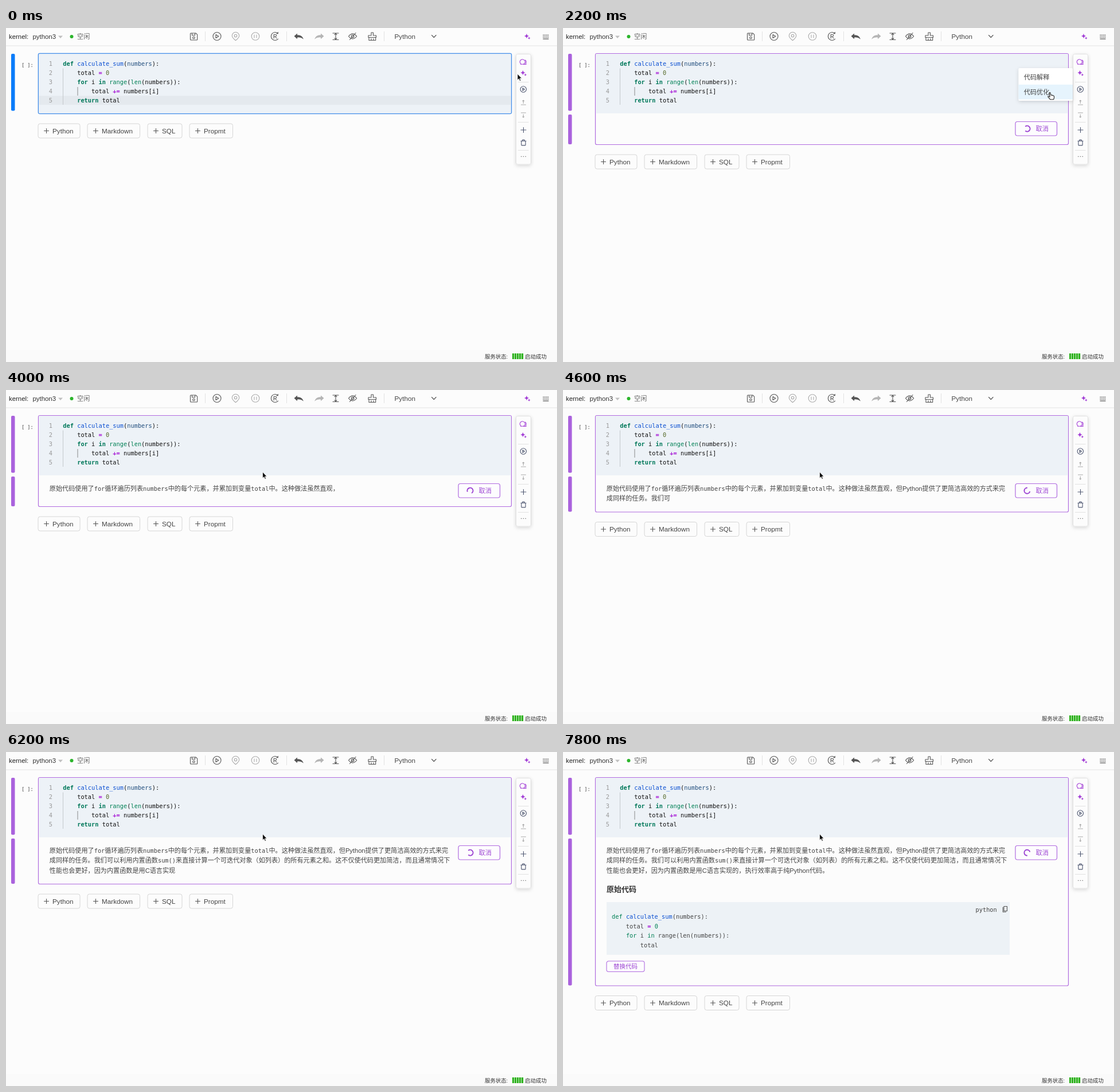
These frames come from a looping animation (961 by 583 pixels, 8 s). An HTML page:

```html
<!DOCTYPE html>
<html lang="zh-CN">
<head>
<meta charset="utf-8">
<title>Notebook assistant</title>
<style>
html, body { margin: 0; width: 100%; height: 100%; overflow: hidden; background: #fcfcfc; }
svg { display: block; width: 961px; height: 583px; }
text { font-family: "Liberation Sans", "Noto Sans CJK SC", "Noto Sans CJK", sans-serif; font-size: 11.13px; fill: #444; white-space: pre; }
.mono { font-family: "DejaVu Sans Mono", "Noto Sans CJK SC", monospace; font-size: 10.34px; }
.code { fill: #111; }
.kw { fill: #00785a; font-weight: bold; }
.tag { fill: #008055; }
.fn { fill: #0a4fd2; }
.par { fill: #24507f; }
.op { fill: #a71bd6; font-weight: bold; }
.num { fill: #566b2a; }
.zero { fill: #008055; }
.icon { fill: none; stroke: #555; stroke-width: 1.1; stroke-linecap: round; stroke-linejoin: round; }
.dim { stroke: #aaa; }
.violet { stroke: #a33fd6; }
.rule { stroke: #e2e2e2; fill: none; }
.box { fill: #fcfcfc; stroke: #d6d6d6; }
.outline { fill: #fdfcfe; stroke: #b06be0; }
.accent { fill: #9d45d3; }
</style>
</head>
<body>
<svg viewBox="0 0 961 583">
  <defs>
    <g id="sparkle" fill="#a33fd6">
      <path d="M-1-5Q-.5-1 3.4-.5Q-.5 0-1 4Q-1.5 0-5.4-.5Q-1.5-1-1-5Z"/>
      <path d="M3.3.8Q3.6 2.9 5.6 3.2Q3.6 3.5 3.3 5.6Q3 3.5 1 3.2Q3 2.9 3.3.8Z"/>
    </g>
    <filter id="shadow" x="-20%" y="-20%" width="140%" height="150%">
      <feDropShadow dx="0" dy="2" stdDeviation="3" flood-opacity=".15"/>
    </filter>
  </defs>
  <rect width="961" height="583" fill="#fcfcfc"/>
  <rect y="562" width="961" height="21" fill="#fafafa"/>
  <path class="rule" d="M0 31H961"/>

  <!-- header -->
  <g style="font-size:11.4px">
    <text x="5" y="18.5" style="font-size:11.4px;fill:#222">kernel</text>
    <text x="36" y="18.5" style="fill:#222">:</text>
    <text x="46.5" y="18.5" style="font-size:11.4px;fill:#333">python3</text>
    <path d="M91 13.5h8l-4 4.5z" fill="#bfbfbf"/>
    <circle cx="114.5" cy="15" r="3" fill="#2bb52b"/>
    <text x="124" y="18.8" style="fill:#666">空闲</text>
  </g>
  <path class="rule" d="M347.5 6V23M489.5 6V23M659.5 6V23"/>
  <g class="icon">
    <path d="M322.5 9h8.5l2.7 2.7v8.3q0 1-1 1h-10.2q-1 0-1-1v-10q0-1 1-1zM324.5 9.3v3.4h5v-3.4"/>
    <circle cx="327.5" cy="17" r="1.8"/>
    <circle cx="368" cy="14.5" r="7"/><path d="M366 11.5v6l4.8-3z"/>
    <g class="dim">
      <path d="M400.5 21.8Q394.3 16.8 394.3 13.5A6.2 6.2 0 0 1 406.7 13.5Q406.7 16.8 400.5 21.8Z"/>
      <circle cx="400.5" cy="13.5" r="2.3"/>
      <circle cx="435" cy="14.5" r="6.8"/><path d="M433 12v5M437 12v5"/>
    </g>
    <path d="M474.5 19.2A7 7 0 1 1 474 9.3M474.3 7.4v2.4h-2.4M467.2 18v-6.8h2.5a1.9 1.9 0 0 1 0 3.8h-2.5M469.6 15l2.2 3"/>
    <path d="M575 9.5v10.5M570 9h10M570 20.5h10M573 11.7l2-2 2 2M573 17.8l2 2 2-2"/>
    <path d="M597.5 14.5Q604.5 5.8 611.7 14.5Q604.5 23.2 597.5 14.5ZM599.5 20.5L610 8.5"/>
    <circle cx="604.6" cy="14.5" r="2.3"/>
    <path d="M637 8h3.5v5h5v3.5h-13.5v-3.5h5zM633 16.5v5h11.7v-5M637 21v-2.5M641 21v-2.5"/>
    <path d="M742.5 12.5l3.8 4 3.8-4"/>
  </g>
  <path d="M502.5 14.3L508 9.5V12.4Q516 11.8 519 19.5Q514 15.5 508 16.4V19.2Z" fill="#555"/>
  <path d="M554.5 14.3L549 9.5V12.4Q541 11.8 538 19.5Q543 15.5 549 16.4V19.2Z" fill="#b5b5b5"/>
  <text x="677.5" y="18.5" style="font-size:11.7px">Python</text>
  <use href="#sparkle" x="909" y="14.5"/>
  <path d="M936.5 12.5h10M936.5 15.8h10" stroke="#555" stroke-width="1.5" stroke-dasharray="1.7 1"/>
  <path d="M936.5 19h10" stroke="#555" stroke-width="1.3"/>

  <!-- cell -->
  <rect id="bar" x="9" y="45" width="6.5" height="99.5" rx="2"/>
  <rect id="bar2" x="9" y="151" width="6.5" rx="2" fill="#aa62dd"/>
  <text class="mono" x="27" y="67.5" style="font-size:8.6px">[ ]:</text>
  <rect id="frame" x="56.5" y="44.5" width="825" rx="2.5" fill="#fcfcfc"/>
  <rect x="57.3" y="45.3" width="823.4" height="103.5" fill="#edf2f7"/>
  <rect id="activeLine" x="57.3" y="118.5" width="823.4" height="15.5" fill="#e4e9ee"/>
  <path d="M99.5 70.5V134" stroke="#c4c8cc"/>
  <path d="M125 103V118" stroke="#888"/>
  <g id="source"></g>

  <!-- answer -->
  <g id="answer">
    <rect class="outline" x="789" y="163.5" width="72.5" height="24.5" rx="3.5" stroke-width="1.2"/>
    <path id="spinner" fill="none" stroke="#9d45d3" stroke-width="2"/>
    <text class="accent" x="824.5" y="179.8">取消</text>
    <g id="prose"></g>
    <text id="heading" x="76" y="244" style="font-size:13px;font-weight:bold;fill:#333"></text>
    <g id="snippet">
      <rect id="snippetBox" x="76" y="262" width="703" fill="#edf2f6"/>
      <text class="mono" x="719.5" y="279">python</text>
      <path class="icon" d="M769 269.5h5.5v8h-5.5zM767.3 271v8.3h5.2" stroke-width="1"/>
      <g id="snippetCode"></g>
      <g id="replace">
        <rect class="outline" x="76" y="0" width="66" height="18.5" rx="3.5" stroke-width="1.1"/>
        <text class="accent" x="88" y="13.2" style="font-size:10.5px">替换代码</text>
      </g>
    </g>
  </g>
  <g id="adders"></g>

  <!-- side tools -->
  <rect x="889.5" y="45.5" width="26" height="192.5" rx="3" fill="#fcfcfc" stroke="#e0e0e0" filter="url(#shadow)" style="flood-opacity:.05"/>
  <rect id="hover" x="890" y="70" width="25" height="23.5" fill="#f0f0f0"/>
  <path class="rule" d="M893 94.5h18.5M893 164.5h18.5M893 213.5h18.5"/>
  <g class="icon">
    <path class="violet" d="M898 62.5a4.6 4.3 0 1 1 4 .8h-4.5zM905.5 56a3.7 3.7 0 0 1 1 5.5l.6 2h-4"/>
    <g stroke="#4d5670">
      <circle cx="902.3" cy="107" r="5.2"/><path d="M901 104.8v4.4l3.4-2.2z"/>
      <path d="M898 178h9M902.5 173.5v9M898 197.3h9M900.7 197v-1.6h3.6v1.6M898.9 197.5v6.4q0 1 1 1h5.2q1 0 1-1v-6.4"/>
    </g>
    <path class="dim" d="M898.5 134h8M902.3 131.5v-5M901 127.5l1.3-1.3 1.3 1.3M898.5 148h8M902.3 151v5M901 154.8l1.3 1.3 1.3-1.3"/>
  </g>
  <path d="M898 224.3h9.5" stroke="#777" stroke-width="1.2" stroke-dasharray="1.4 2.4"/>
  <use href="#sparkle" x="902.5" y="78.5"/>

  <g id="menu">
    <rect x="794.5" y="70" width="94.5" height="57" rx="2" fill="#fff" filter="url(#shadow)"/>
    <rect id="menuHover" x="794.5" y="98.8" width="94.5" height="25.7" fill="#e6f4fd"/>
    <text x="803.8" y="90">代码解释</text>
    <text x="803.8" y="115.6">代码优化</text>
  </g>

  <!-- status -->
  <text x="835" y="576.5" style="font-size:9.4px;fill:#333">服务状态:</text>
  <path d="M883 573h19.4" stroke="#2fb31f" stroke-width="10" stroke-dasharray="3.2 .8"/>
  <text x="905" y="576.5" style="font-size:9.5px;fill:#333">启动成功</text>

  <path id="arrow" d="M0 0V11L2.5 8.7L4.2 12.5L6 11.7L4.3 8H7.6Z" fill="#111" stroke="#fff" stroke-width=".8"/>
  <path id="hand" d="M-1 .2Q0-1 1 .2L2 4.3Q3.2 3.5 4 4.6Q5.2 4 5.8 5Q7.3 4.8 7.5 6.3Q8 9 6.7 11.8H.8Q-1.5 8.8-3.2 7.2Q-3.4 5.6-1.7 6.1L.2 7.3Z" fill="#fff" stroke="#222" stroke-width="1.1" stroke-linejoin="round"/>
</svg>
<script>
const LOOP = 8000, STEP = 200;
const $ = id => document.getElementById(id);
const set = (id, attrs) => Object.entries(attrs).forEach(([k, v]) => $(id).setAttribute(k, v));
const show = (id, on) => { $(id).style.display = on ? "" : "none"; };
const escape = s => s.replace(/&/g, "&amp;").replace(/</g, "&lt;");

// Each line is a list of [text, class] runs.
const source = [
  [["def ", "kw"], ["calculate_sum", "fn"], ["("], ["numbers", "par"], ["):"]],
  [["    total "], ["=", "op"], [" "], ["0", "num"]],
  [["    "], ["for", "kw"], [" i "], ["in", "kw"], [" "], ["range", "tag"], ["("], ["len", "tag"], ["(numbers)):"]],
  [["        total "], ["+=", "op"], [" numbers[i]"]],
  [["    "], ["return", "kw"], [" total"]]
];
const prose = [
  [["原始代码使用了"], ["for", "mono"], ["循环遍历列表"], ["numbers", "mono"], ["中的每个元素,并累加到变量"], ["total", "mono"], ["中。这种做法虽然直观,但Python提供了更简洁高效的方式来完"]],
  [["成同样的任务。我们可以利用内置函数"], ["sum()", "mono"], ["来直接计算一个可迭代对象(如列表)的所有元素之和。这不仅使代码更加简洁,而且通常情况下"]],
  [["性能也会更好,因为内置函数是用C语言实现的,执行效率高于纯Python代码。"]]
].map(line => line.map(([s, c]) => [c ? s : s.replace(/,/g, "\uff0c").replace(/\(/g, "\uff08").replace(/\)/g, "\uff09"), c]));
const heading = "原始代码";
const snippet = [
  [["def ", "tag"], ["calculate_sum", "fn"], ["(numbers):"]],
  [["    total "], ["=", "op"], [" "], ["0", "zero"]],
  [["    "], ["for", "tag"], [" i "], ["in", "tag"], [" range(len(numbers)):"]],
  [["        total"]]
];
const size = lines => lines.flat().reduce((n, [s]) => n + s.length, 0);
const proseSize = size(prose), snippetSize = size(snippet);

// Writes the first `count` characters and returns the number of lines begun.
function write(id, lines, x, y, gap, cls, count = Infinity) {
  let begun = 0, html = "";
  lines.forEach((line, i) => {
    if (count <= 0) return;
    begun++;
    html += `<text class="${cls}" x="${x}" y="${y + i * gap}">`;
    for (const [s, c = ""] of line) {
      html += `<tspan class="${c}">${escape(s.slice(0, Math.max(0, count)))}</tspan>`;
      count -= s.length;
    }
    html += "</text>";
  });
  $(id).innerHTML = html;
  return begun;
}

// Linear interpolation over rows of [time, ...values].
function track(rows, t) {
  const i = rows.findIndex(r => r[0] > t);
  if (i < 0) return rows[rows.length - 1].slice(1);
  if (i === 0) return rows[0].slice(1);
  const a = rows[i - 1], b = rows[i], p = (t - a[0]) / (b[0] - a[0]);
  return a.slice(1).map((v, k) => v + (b[k + 1] - v) * p);
}

const pointer = [[0, 892, 80], [200, 894, 81], [600, 901, 80], [1400, 901, 80], [1600, 885, 97],
  [1800, 856, 111], [2000, 849, 113], [2400, 849, 113], [2600, 690, 128], [2800, 500, 141], [3000, 447.5, 143]];
const typed = [[3000, 0], [4000, 52], [5400, 122], [6200, 157], [6600, proseSize],
  [6800, proseSize + heading.length], [7800, proseSize + heading.length + snippetSize]];

write("source", source, 99.3, 66.3, 16, "mono code");
$("source").innerHTML += source.map((_, i) =>
  `<text class="mono" x="74.8" y="${66.3 + i * 16}" style="fill:#999">${i + 1}</text>`).join("");
$("adders").innerHTML = [["Python", 56, 73], ["Markdown", 142, 91.5], ["SQL", 247, 60], ["Propmt", 320, 75.5]]
  .map(([label, x, w]) => `<rect class="box" x="${x}" y="18" width="${w}" height="25" rx="3.5"/>
    <path class="icon" d="M${x + 10.5} 30.5h8M${x + 14.5} 26.5v8" stroke-width="1"/>
    <text x="${x + 25}" y="34.5" style="font-size:11.7px">${label}</text>`).join("");

function draw(t) {
  const busy = t >= 2200;
  const count = Math.round(track(typed, t)[0]);
  const headCount = count - proseSize, codeCount = headCount - heading.length;
  let bottom = 149.5;

  show("answer", busy);
  show("bar2", busy);
  show("activeLine", !busy);
  if (busy) {
    const lines = write("prose", prose, 75.8, 175.8, 17.5, "", count);
    bottom = [203.5, 203.5, 213, 230.5][lines];
    $("heading").textContent = heading.slice(0, Math.max(0, headCount));
    if (headCount > 0) bottom = 263;
    show("snippet", codeCount > 0);
    if (codeCount > 0) {
      const rows = write("snippetCode", snippet, 85, 291.4, 16.4, "mono", codeCount);
      const end = 354 - (4 - rows) * 16.4;
      set("snippetBox", { height: end - 262 });
      set("replace", { transform: `translate(0 ${end + 11})` });
      bottom = end + 54;
    }
    const gap = 180 + (t - 2200) * .36;
    set("spinner", { d: "M3.2 3.8A5 5 0 1 1 3.2-3.8", transform: `translate(809.5 175.8) rotate(${gap})` });
    set("bar2", { height: bottom - 151.5 });
  }
  set("bar", { fill: busy ? "#aa62dd" : "#0b7cfa" });
  set("frame", { height: bottom - 44.5, stroke: busy ? "#b06be0" : "#468fe9", "stroke-width": busy ? 1.2 : 1.6 });
  set("adders", { transform: `translate(0 ${bottom - .5})` });

  const [x, y] = track(pointer, t), hand = t >= 400 && t < 2600;
  show("arrow", !hand);
  show("hand", hand);
  set(hand ? "hand" : "arrow", { transform: `translate(${x} ${y})` });
  show("hover", t >= 400 && t < 1600);
  show("menu", t >= 1400 && t < 2600);
  show("menuHover", t >= 1800);
}

const start = performance.now();
let last = -1;
function tick() {
  const t = Math.floor((performance.now() - start) % LOOP / STEP) * STEP;
  if (t !== last) draw(last = t);
  requestAnimationFrame(tick);
}
tick();
</script>
</body>
</html>
```
